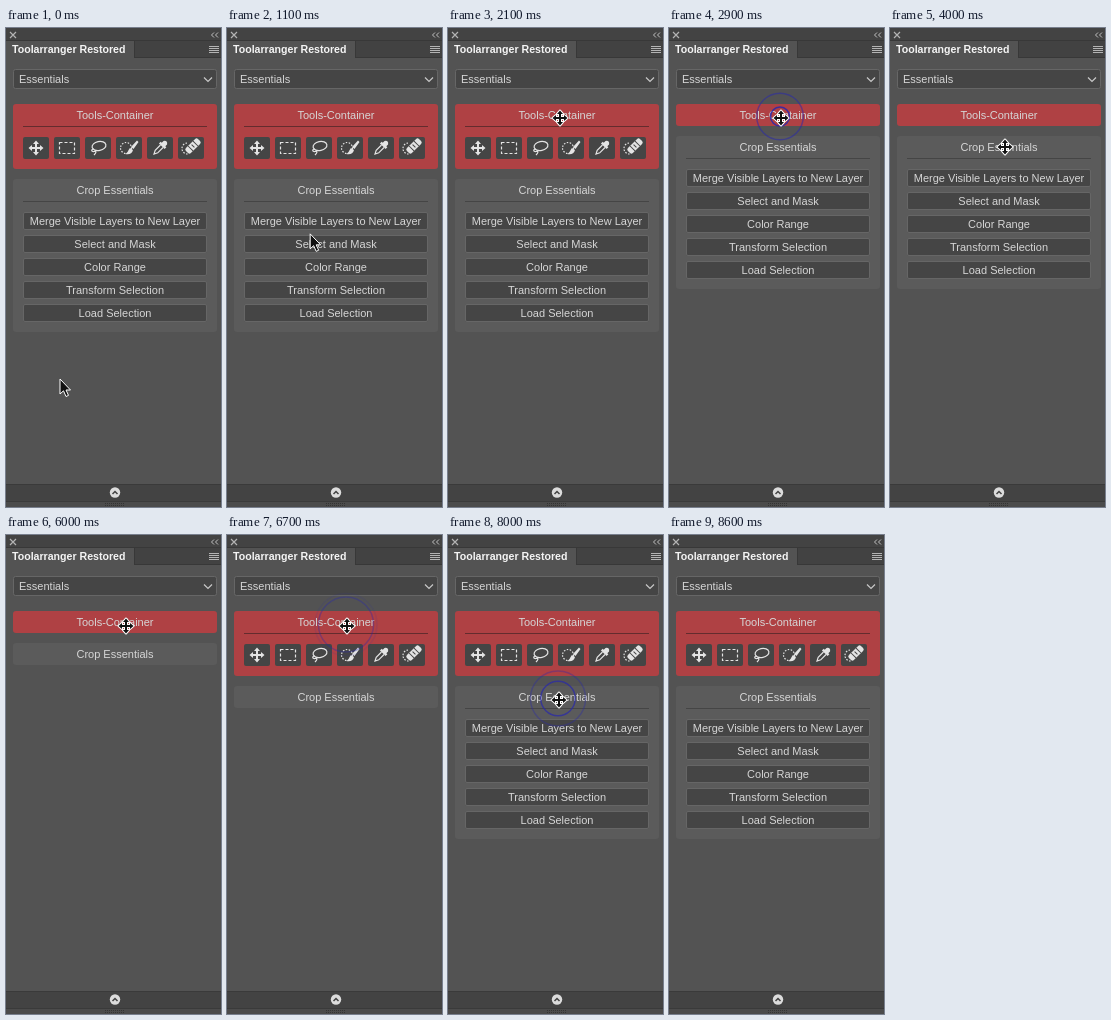
Write an HTML page that moves like this. It is 215 px wide and 479 px high and loops after 9800 ms.

```html
<!DOCTYPE html>
<html lang="en">
<head>
<meta charset="utf-8">
<title>Tool panel</title>
<style>
  html, body { margin: 0; width: 100%; height: 100%; overflow: hidden; background: #535353; }
  svg { display: block; width: 215px; height: 479px; }
  text { font: 11px "Liberation Sans", Arial, sans-serif; fill: #d6d6d6; }
  .mid { text-anchor: middle; }
  .title { font-size: 10.6px; font-weight: bold; fill: #f4f4f4; }
  .field { fill: #454545; stroke: #666; }
  .hover text { fill: #fff; }
  .icon { fill: none; stroke: #e4e4e4; stroke-width: 1.2; }
  .solid { fill: #e4e4e4; stroke: none; }
  .ring { fill: none; stroke: #2626b0; stroke-width: 1.5; }
</style>
</head>
<body>
<svg viewBox="0 0 215 479">
  <defs>
    <path id="cross" d="M0-7.5 3-4H1V-1H4V-3L7.5 0 4 3V1H1V4H3L0 7.5-3 4H-1V1H-4V3L-7.5 0-4-3V-1H-1V-4H-3Z"/>
  </defs>
  <rect width="215" height="479" fill="#535353"/>

  <!-- title bar and tab -->
  <rect width="215" height="13" fill="#434343"/>
  <rect x="128" y="13" width="87" height="17" fill="#424242"/>
  <path d="M0 12.5H215M128.5 13V30M128 29.5H215" stroke="#383838"/>
  <path d="M4 4 10 10M10 4 4 10" stroke="#b4b4b4" stroke-width="1.2"/>
  <path d="M208 4.5 205.500 7 208 9.500M212 4.500 209.500 7 212 9.500" fill="none" stroke="#c0c0c0"/>
  <path d="M203 18.500H213M203 20.500H213M203 22.500H213M203 24.500H213" stroke="#b4b4b4"/>
  <text class="title" x="6" y="25">Toolarranger Restored</text>

  <!-- drop-down -->
  <rect class="field" x="7.500" y="41.500" width="203" height="19" rx="2"/>
  <text x="13" y="55">Essentials</text>
  <path d="M198 49.500 202 53.500 206 49.500" fill="none" stroke="#c8c8c8" stroke-width="1.2"/>

  <!-- tools -->
  <rect id="toolsBox" x="7" y="76" width="204" height="65" rx="3" fill="#af4144"/>
  <text class="mid" x="109" y="91">Tools-Container</text>
  <g id="toolsBody">
    <path d="M17 98.500H201" stroke="#642c2e"/>
    <g id="tiles"></g>
    <use href="#cross" class="solid" x="30" y="120"/>
    <rect class="icon" x="53.500" y="114.500" width="15" height="11" stroke-dasharray="3 2"/>
    <g class="icon">
      <ellipse cx="93" cy="118" rx="7" ry="4.500" transform="rotate(-12 93 118)"/>
      <path d="M88 121C85 121 85 124 88 123.500S90 125 88 127"/>
    </g>
    <g class="icon">
      <circle cx="120" cy="120" r="5.500" stroke-dasharray="1.5 1.5"/>
      <path class="solid" d="M131 112.500 132.500 114 127.500 121 125 119Z M124 120 127 122C126 126 123 127 119 126 122 125 122 122 124 120Z"/>
    </g>
    <g transform="translate(154 120) rotate(45)">
      <path class="solid" d="M-2.500-5V-7.500Q0-11 2.500-7.500V-5H4V-2.500H-4V-5Z"/>
      <path class="icon" d="M-1.800-2.500V5L0 8.500 1.800 5V-2.500"/>
    </g>
    <g transform="translate(187 118) rotate(45)">
      <rect class="solid" x="-3.500" y="-8.500" width="7" height="17" rx="2"/>
      <path d="M-3.500-3.500H3.500M-3.500 3.500H3.500M-2 0H2" stroke="#454545"/>
    </g>
    <path class="icon" d="M181 115A5.500 5.500 0 0 0 182 126" stroke-dasharray="1.5 1.5"/>
  </g>

  <!-- crop -->
  <g id="crop">
    <rect id="cropBox" x="7" y="151" width="204" height="153" rx="3" fill="#5b5b5b"/>
    <text class="mid" x="109" y="166">Crop Essentials</text>
    <g id="cropBody"><path d="M17 173.500H201" stroke="#454545"/></g>
  </g>

  <!-- footer -->
  <rect y="456" width="215" height="17" fill="#434343"/>
  <path d="M0 456.500H215M0 473.500H215" stroke="#3a3a3a"/>
  <rect y="474" width="215" height="5" fill="#4b4b4b"/>
  <path d="M99 475.500H118M99 477.500H118" stroke="#343434" stroke-dasharray="1 1"/>
  <circle cx="109" cy="464.500" r="5.200" fill="#dcdcdc"/>
  <path d="M106.500 466 109 463.500 111.500 466" fill="none" stroke="#434343" stroke-width="1.5"/>

  <circle class="ring"/>
  <circle class="ring"/>
  <g id="cursor" stroke="#fff" stroke-linejoin="round">
    <path id="arrow" d="M0 0V15L3.500 11.800 6 17.500 8.500 16.400 6 11H10.500Z" fill="#111"/>
    <use id="mover" href="#cross" fill="#111" stroke-width="2" style="paint-order: stroke"/>
  </g>
</svg>
<script>
const LOOP = 9800, STEP = 100;
const CLICKS = [2500, 4000, 6000, 7500];
const RING_LIFE = 600, RING_MAX = 31;
const $ = id => document.getElementById(id);
const rings = [...document.querySelectorAll('.ring')];
const labels = ['Merge Visible Layers to New Layer', 'Select and Mask', 'Color Range',
  'Transform Selection', 'Load Selection'];

// time, x, y of the pointer
const path = [
  [500, 54, 351], [1500, 99, 127], [2100, 112, 90],
  [3400, 112, 90], [3600, 121, 106], [3800, 115, 119],
  [5300, 115, 119], [5900, 120, 91],
  [6800, 120, 91], [7000, 92, 126], [7300, 111, 165],
  [8300, 111, 165], [8600, 150, 490]
];

function add(parent, tag, attrs, text = '') {
  const el = document.createElementNS('http://www.w3.org/2000/svg', tag);
  for (const k in attrs) el.setAttribute(k, attrs[k]);
  el.textContent = text;
  return parent.appendChild(el);
}

for (let i = 0; i < 6; i++)
  add($('tiles'), 'rect', { x: 17 + 31 * i, y: 109, width: 26, height: 22, rx: 2, fill: '#454545' });

const buttons = labels.map((label, i) => {
  const y = 184 + 23 * i, g = add($('cropBody'), 'g', {});
  add(g, 'rect', { class: 'field', x: 17.5, y: y + .5, width: 183, height: 17, rx: 1.5 });
  add(g, 'text', { class: 'mid', x: 109, y: y + 13 }, label);
  return { g, y };
});

const show = (el, on) => el.setAttribute('visibility', on ? 'visible' : 'hidden');
const within = (v, lo, hi) => v >= lo && v <= hi;

function pointer(t) {
  const next = path.findIndex(p => p[0] > t);
  if (next <= 0) return (next ? path[path.length - 1] : path[0]).slice(1);
  const a = path[next - 1], b = path[next];
  const u = (t - a[0]) / (b[0] - a[0]), e = u * u * (3 - 2 * u);
  return [a[1] + (b[1] - a[1]) * e, a[2] + (b[2] - a[2]) * e];
}

function draw(t) {
  const toolsOpen = !within(t, 2700, 6199), cropOpen = !within(t, 4200, 7699);
  const shift = toolsOpen ? 0 : -43, cropTop = 151 + shift;
  show($('toolsBody'), toolsOpen);
  show($('cropBody'), cropOpen);
  $('toolsBox').setAttribute('height', toolsOpen ? 65 : 22);
  $('cropBox').setAttribute('height', cropOpen ? 153 : 22);
  $('crop').setAttribute('transform', `translate(0 ${shift})`);

  const [x, y] = pointer(t);
  const onHeader = within(y, 76, 98) || within(y, cropTop, cropTop + 22);
  $('cursor').setAttribute('transform', `translate(${x} ${y})`);
  show($('cursor'), t < 8600);
  $('arrow').style.display = onHeader ? 'none' : '';
  $('mover').style.display = onHeader ? '' : 'none';
  for (const b of buttons)
    b.g.classList.toggle('hover', cropOpen && t < 8600 && within(y - shift, b.y, b.y + 18));

  const click = CLICKS.filter(c => c <= t).pop();
  rings.forEach((ring, i) => {
    const u = (t - click - 100 - 200 * i) / RING_LIFE;
    const live = u > 0 && u <= 1;
    show(ring, live);
    if (!live) return;
    const [cx, cy] = pointer(click);
    ring.setAttribute('cx', cx - 1);
    ring.setAttribute('cy', cy - 1.5);
    ring.setAttribute('r', RING_MAX * (1 - (1 - u) ** 2));
    ring.setAttribute('opacity', Math.max(.1, 1 - u));
  });
}

const start = performance.now();
function tick() {
  const t = (performance.now() - start) % LOOP;
  draw(Math.floor(t / STEP) * STEP);
  requestAnimationFrame(tick);
}
tick();
</script>
</body>
</html>
```
